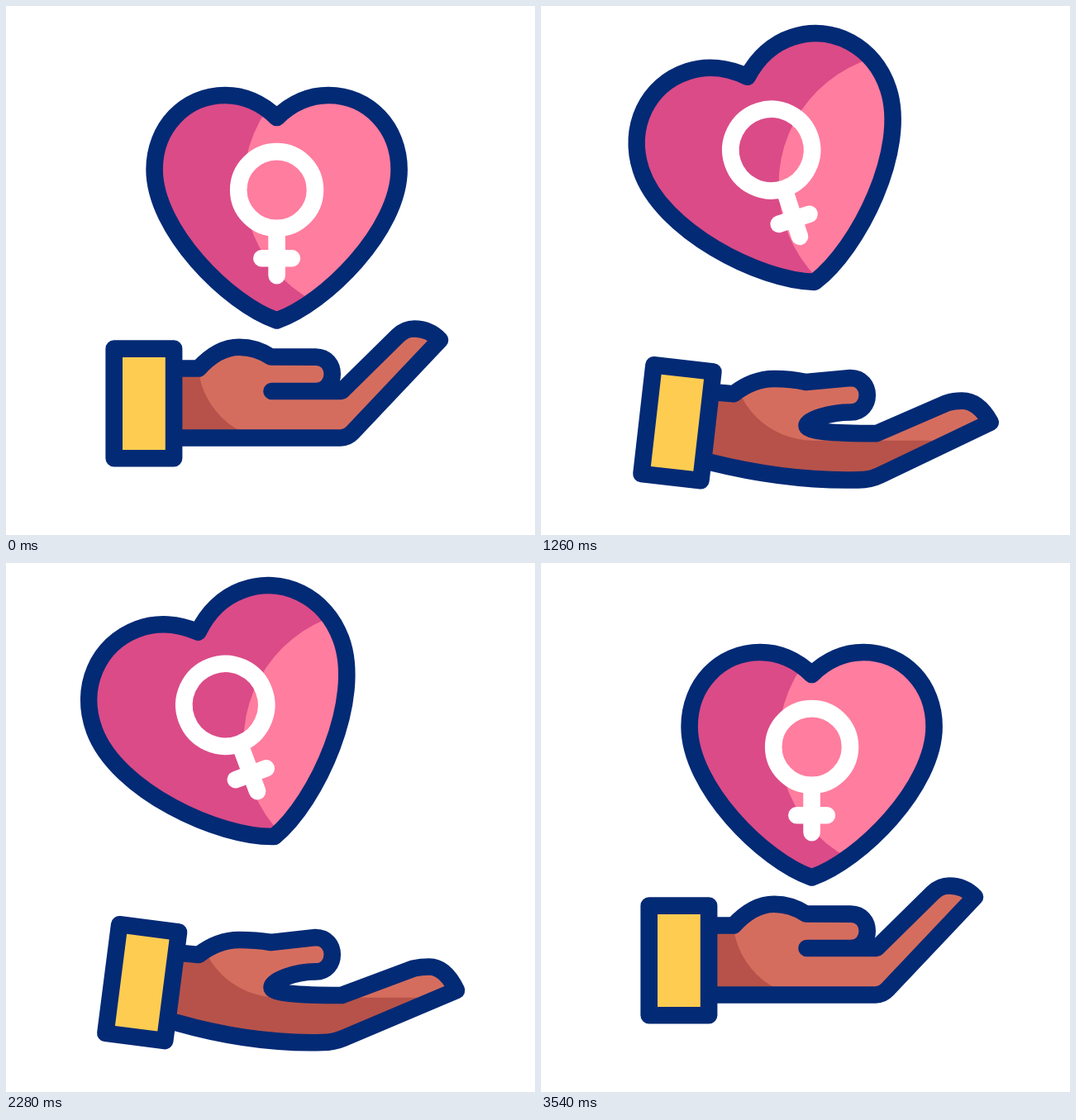
Animation of 640x640 px, one loop 3600 ms. Source, as an HTML page with a canvas:

```html
<!DOCTYPE html>
<html lang="en">
<head>
<meta charset="utf-8">
<title>Heart in hand</title>
<style>
html, body { margin: 0; width: 100%; height: 100%; overflow: hidden; background: #fff; }
canvas { display: block; width: 640px; height: 640px; }
</style>
</head>
<body>
<canvas id="stage" width="640" height="640"></canvas>
<script>
const ctx = document.getElementById('stage').getContext('2d');
const LOOP = 3600, LINE = 20.6;
const NAVY = '#032a75', TEAL = '#9adfe2', WHITE = '#fff', YELLOW = '#ffcc52';
const PINK = '#ff7d9f', MAGENTA = '#db4b87', SKIN = '#d56d5e', SHADE = '#b65249';

// Hand pose: cuff y, cuff tilt, wrist, bump top, bump end, thumb top, crease, palm top,
// knuckle xy, finger top xy, fingertip xy, heel xy, palm bottom xy, wrist bottom
const hand = {
  rest: [480.9, 0, 438.5, 412.7, 424.5, 424.6, 466, 466, 474, 399, 494, 390.5, 525, 404, 419, 516, 405, 522.5, 522.5],
  dip: [490.4, 3, 450.5, 428.5, 437, 435.5, 484, 486.5, 484, 430, 501, 425.5, 534, 443, 418, 534, 395, 543, 535],
  low: [502.5, 6.1, 467, 448.5, 453, 448.5, 505, 514, 490, 475, 508, 472, 543, 497, 411, 564, 385, 570, 550.5],
  lowest: [507.7, 7.3, 474, 456, 459, 453, 513.5, 523, 493, 490.5, 512, 488.5, 545, 517, 408, 575, 383, 580, 556],
  flick: [487.5, -1.3, 445, 418, 424, 419, 470, 470, 461, 402.5, 484, 391.5, 511, 402, 430, 518, 410, 526, 530]
};
// Heart pose: ring centre xy, lean in degrees, scale
const heart = {
  rest: [327.6, 222.5, 0, 1],
  lift: [314, 196, 6.9, 1.022],
  high: [282, 175, 16.6, 1.06],
  drift: [275.2, 173.5, 19.4, 1.067],
  peak: [265.3, 171.8, 20.4, 1.075],
  drop: [313.5, 203, 6.6, 0.966],
  land: [323, 212, 2.8, 0.967],
  settle: [327.8, 221, 0, 0.99]
};

const mix = (a, b, k) => a.map((v, i) => v + (b[i] - v) * k);

const keys = [
  [160, hand.rest, heart.rest],
  [400, hand.dip, heart.lift],
  [680, mix(hand.dip, hand.low, 0.9), mix(heart.lift, heart.high, 0.92)],
  [920, hand.low, heart.high],
  [1600, mix(hand.low, hand.lowest, 0.62), heart.drift],
  [2280, hand.lowest, heart.peak],
  [2340, mix(hand.low, hand.lowest, 1.05), mix(heart.drift, heart.peak, 1.15)],
  [2720, hand.flick, heart.drop],
  [2860, mix(hand.flick, hand.rest, 0.55), heart.land],
  [3120, mix(hand.flick, hand.rest, 0.9), heart.settle],
  [3540, hand.rest, heart.rest]
].map(([t, h, l]) => ({ t, v: [...h, ...l] }));

// Monotone cubic slopes, so that no part overshoots its keys
const secant = (i, c) => (keys[i + 1].v[c] - keys[i].v[c]) / (keys[i + 1].t - keys[i].t);
keys.forEach((key, i) => {
  key.m = key.v.map((_, c) => {
    if (i === 0 || i === keys.length - 1) return 0;
    const a = secant(i - 1, c), b = secant(i, c);
    return a * b <= 0 ? 0 : 2 * a * b / (a + b);
  });
});

function poseAt(t) {
  if (t <= keys[0].t) return keys[0].v;
  const i = keys.findIndex(k => k.t > t);
  if (i < 0) return keys[keys.length - 1].v;
  const a = keys[i - 1], b = keys[i], d = b.t - a.t, u = (t - a.t) / d;
  const w = u * u * (3 - 2 * u);
  return a.v.map((v, c) => v + (b.v[c] - v) * w
    + d * u * (1 - u) * ((1 - u) * a.m[c] - u * b.m[c]));
}

const smooth = (t, from, to) => {
  const u = Math.min(1, Math.max(0, (t - from) / (to - from)));
  return u * u * (3 - 2 * u);
};

function outline(path, color = NAVY, width = LINE) {
  ctx.strokeStyle = color;
  ctx.lineWidth = width;
  ctx.stroke(path);
}

function fillIn(path, color) {
  ctx.fillStyle = color;
  ctx.fill(path);
}

// The lit areas stay fixed on the stage while the shapes move through them
const heartLight = new Path2D();
heartLight.arc(447.5, 216, 160, 0, Math.PI * 2);

const handLight = new Path2D();
handLight.moveTo(232, 360);
handLight.lineTo(232, 428.7);
handLight.arc(329, 428.7, 97, Math.PI, Math.PI / 2, true);
handLight.lineTo(600, 525.7);
handLight.lineTo(600, 360);
handLight.closePath();

const heartShape = new Path2D();
heartShape.moveTo(0, -87.5);
heartShape.bezierCurveTo(-17.5, -104.5, -39.5, -114.5, -62.5, -114.5);
heartShape.bezierCurveTo(-111, -114.5, -148, -75.5, -148, -24.5);
heartShape.bezierCurveTo(-148, 48, -59, 137.5, 0, 158);
heartShape.bezierCurveTo(59, 137.5, 148, 48, 148, -24.5);
heartShape.bezierCurveTo(148, -75.5, 111, -114.5, 62.5, -114.5);
heartShape.bezierCurveTo(39.5, -114.5, 17.5, -104.5, 0, -87.5);
heartShape.closePath();

const symbol = new Path2D();
symbol.arc(0, 0, 46.4, 0, Math.PI * 2);
symbol.moveTo(0, 46.4);
symbol.lineTo(0, 103.6);
symbol.moveTo(-18.3, 82.8);
symbol.lineTo(18.3, 82.8);

const cuff = new Path2D();
cuff.rect(-36.2, -66.3, 72.4, 132.6);

function handShape(p) {
  const [, tilt, wrist, bump, bumpEnd, thumb, crease, palm,
    kx, ky, tx, ty, px, py, hx, hy, bx, by, base] = p;
  const under = thumb + 41.4, sag = by - base;
  // Where the finger's underside, carried on, meets the palm's bottom
  const cornerX = hx - (by - hy) * (px - hx) / (hy - py);
  const s = new Path2D();
  s.moveTo(195, wrist - tilt * 0.5);
  s.lineTo(233, wrist);
  s.bezierCurveTo(246, bump + 0.45 * (wrist - bump), 263, bump, 282, bump);
  s.bezierCurveTo(296, bump, 309, bump + 0.35 * (bumpEnd - bump), 320.5, bumpEnd);
  s.lineTo(374.5, thumb);
  s.bezierCurveTo(401.5, thumb, 401.5, under, 374.5, under);
  s.bezierCurveTo(350, under, 321.5, crease - 0.45 * (crease - under), 321.5, crease);
  s.bezierCurveTo(321.5, crease + 0.7 * (palm - crease), 350, palm, 406, palm);
  s.lineTo(kx, ky);
  s.bezierCurveTo(kx + 0.35 * (tx - kx), ky + 0.75 * (ty - ky), tx - 0.4 * (tx - kx), ty, tx, ty);
  s.bezierCurveTo(tx + 0.42 * (px - tx), ty, px - 0.25 * (px - tx), py - 0.6 * (py - ty), px, py);
  s.lineTo(hx, hy);
  s.quadraticCurveTo(cornerX, by, bx, by);
  s.bezierCurveTo(bx - 60, by + 0.07 * sag, 265, base + 0.7 * sag, 206, base);
  s.lineTo(195, base - tilt * 0.3);
  return s;
}

function drawHand(p) {
  const shape = handShape(p);
  fillIn(shape, SHADE);
  ctx.save();
  ctx.clip(shape);
  fillIn(handLight, SKIN);
  ctx.restore();
  outline(shape);

  ctx.save();
  ctx.translate(166.9 - 0.3 * Math.abs(p[1]), p[0]);
  ctx.rotate(p[1] * Math.PI / 180);
  fillIn(cuff, YELLOW);
  outline(cuff);
  ctx.restore();
}

function drawSparks(t) {
  const size = LINE * smooth(t, 2660, 2710) * (1 - smooth(t, 3080, 3230));
  if (size <= 0) return;
  const head = smooth(t, 2680, 3000), tail = smooth(t, 2840, 3230);
  const rays = new Path2D();
  for (const side of [-1, 1]) {
    for (const [x, y, dx, dy] of [[137, -112, 17, -38], [165, -92, 43, -18]]) {
      rays.moveTo(6.5 + side * (x + dx * tail), y + dy * tail);
      rays.lineTo(6.5 + side * (x + dx * head + 0.1), y + dy * head);
    }
  }
  outline(rays, TEAL, size);
}

function drawHeart([x, y, lean, scale], t) {
  const place = () => {
    ctx.translate(x, y);
    ctx.rotate(-lean * Math.PI / 180);
  };
  ctx.save();
  place();
  drawSparks(t);
  ctx.scale(scale, scale);
  fillIn(heartShape, MAGENTA);
  ctx.clip(heartShape);
  ctx.resetTransform();
  fillIn(heartLight, PINK);
  ctx.restore();

  ctx.save();
  place();
  ctx.scale(scale, scale);
  outline(heartShape, NAVY, LINE / scale);
  outline(symbol, WHITE, LINE / scale);
  ctx.restore();
}

function draw(now) {
  const t = now % LOOP, pose = poseAt(t), split = hand.rest.length;
  ctx.fillStyle = WHITE;
  ctx.fillRect(0, 0, 640, 640);
  ctx.lineJoin = ctx.lineCap = 'round';
  drawHand(pose.slice(0, split));
  drawHeart(pose.slice(split), t);
}

const start = performance.now();
function tick() {
  draw(performance.now() - start);
  requestAnimationFrame(tick);
}
tick();
</script>
</body>
</html>
```
